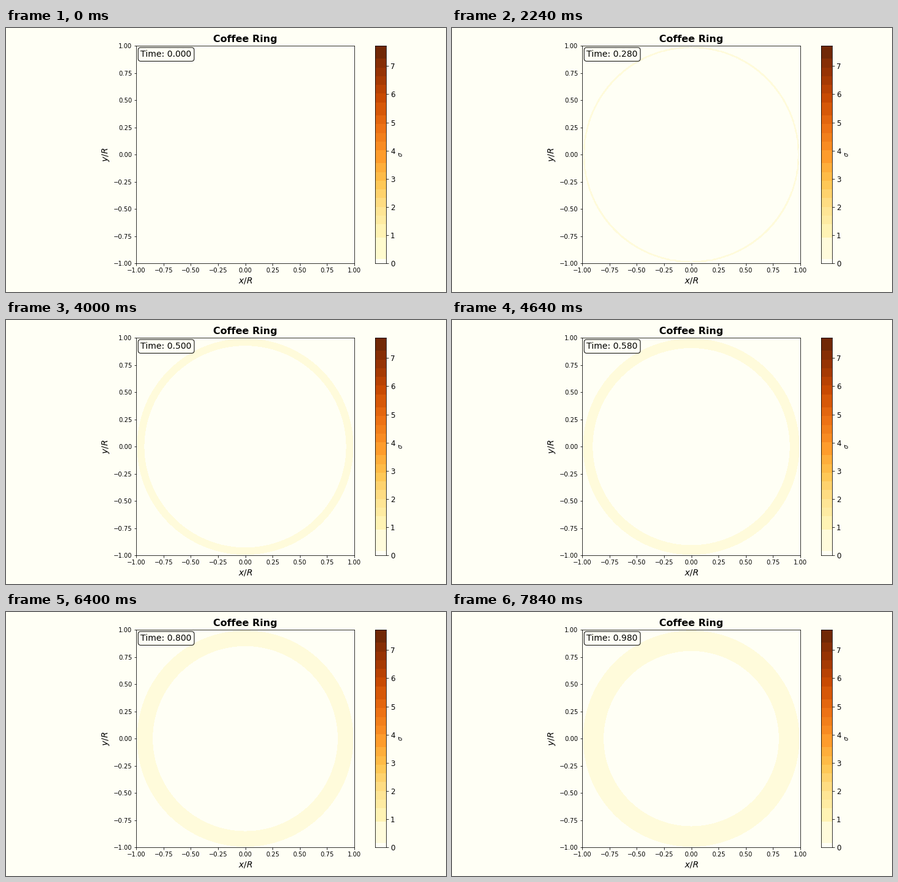
Write a matplotlib script that moves like this. It is 720 by 432 pixels and loops after 8 s.

```python
import numpy as np
import matplotlib.pyplot as plt
from matplotlib.animation import FuncAnimation

W, H, DPI = 720, 432, 72
FRAMES, STEP_MS = 50, 160
PAPER = "#fffff5"
STAIN = "#fffbdb"
DRY = "#fffbce"
SIGMA_MAX = 7.72
OUTER = 0.99

plt.rcParams["font.family"] = "DejaVu Sans"
fig = plt.figure(figsize=(W / DPI, H / DPI), dpi=DPI, facecolor=PAPER)


def add_axes(left, top, width, height):
    """Axes placed in pixels, measured from the top left corner."""
    box = [left / W, 1 - (top + height) / H, width / W, height / H]
    return fig.add_axes(box, facecolor=PAPER)


ax = add_axes(213.3, 29.0, 356.4, 356.4)
ax.set(xlim=(-1, 1), ylim=(-1, 1))
ticks = np.linspace(-1, 1, 9)
ax.set_xticks(ticks)
ax.set_yticks(ticks)
ax.set_title("Coffee Ring", fontsize=16, fontweight="bold")
ax.set_xlabel("$x/R$", fontsize=14)
ax.set_ylabel("$y/R$", fontsize=14)
clock = ax.text(0.02, 0.98, "", transform=ax.transAxes, fontsize=14, va="top",
                zorder=5, bbox=dict(boxstyle="round", facecolor=PAPER))

# Colour scale: 50 fine levels gathered into wider bands
bar = add_axes(604.2, 29.0, 17.8, 356.4)
bar.set(xlim=(0, 1), ylim=(0, SIGMA_MAX), xticks=[], yticks=range(8))
bar.yaxis.tick_right()
bar.yaxis.set_label_position("right")
bar.tick_params(axis="y", labelsize=12)
bar.set_ylabel(r"$\sigma$")
edges = np.array([0, 1, 6, 9, 11, 13, 15, 17, 19, 21, 23, 26, 28,
                  30, 32, 34, 37, 39, 41, 43, 45, 47, 50]) / 50
bands = []
for lo, hi in zip(edges[:-1], edges[1:]):
    color = plt.cm.YlOrBr((lo + hi) / 2) if lo else PAPER
    bands.append(bar.axhspan(lo * SIGMA_MAX, hi * SIGMA_MAX, facecolor=color,
                             linewidth=0, antialiased=False))

grid = np.linspace(-1, 1, 200)
X, Y = np.meshgrid(grid, grid)
R = np.hypot(X, Y)
rings = []


def inner_radius(t):
    return np.interp(t, [0.14, 0.28, 0.42, 0.5, 0.68, 0.8, 0.98],
                     [OUTER, 0.980, 0.963, 0.929, 0.880, 0.852, 0.807])


def update(i):
    t = i * 0.02
    clock.set_text(f"Time: {t:.3f}")
    while rings:
        rings.pop().remove()
    inner = inner_radius(t)
    wet = inner < OUTER - 1e-6
    bands[1].set_facecolor(STAIN if wet else DRY)
    if wet:
        depth = np.minimum(R - inner, OUTER - R)
        rings.append(ax.contourf(X, Y, depth, levels=[0, 1], colors=[STAIN]))
    return []


anim = FuncAnimation(fig, update, frames=FRAMES, init_func=lambda: update(0),
                     interval=STEP_MS, repeat=True, repeat_delay=0, blit=False)
plt.show()
```
